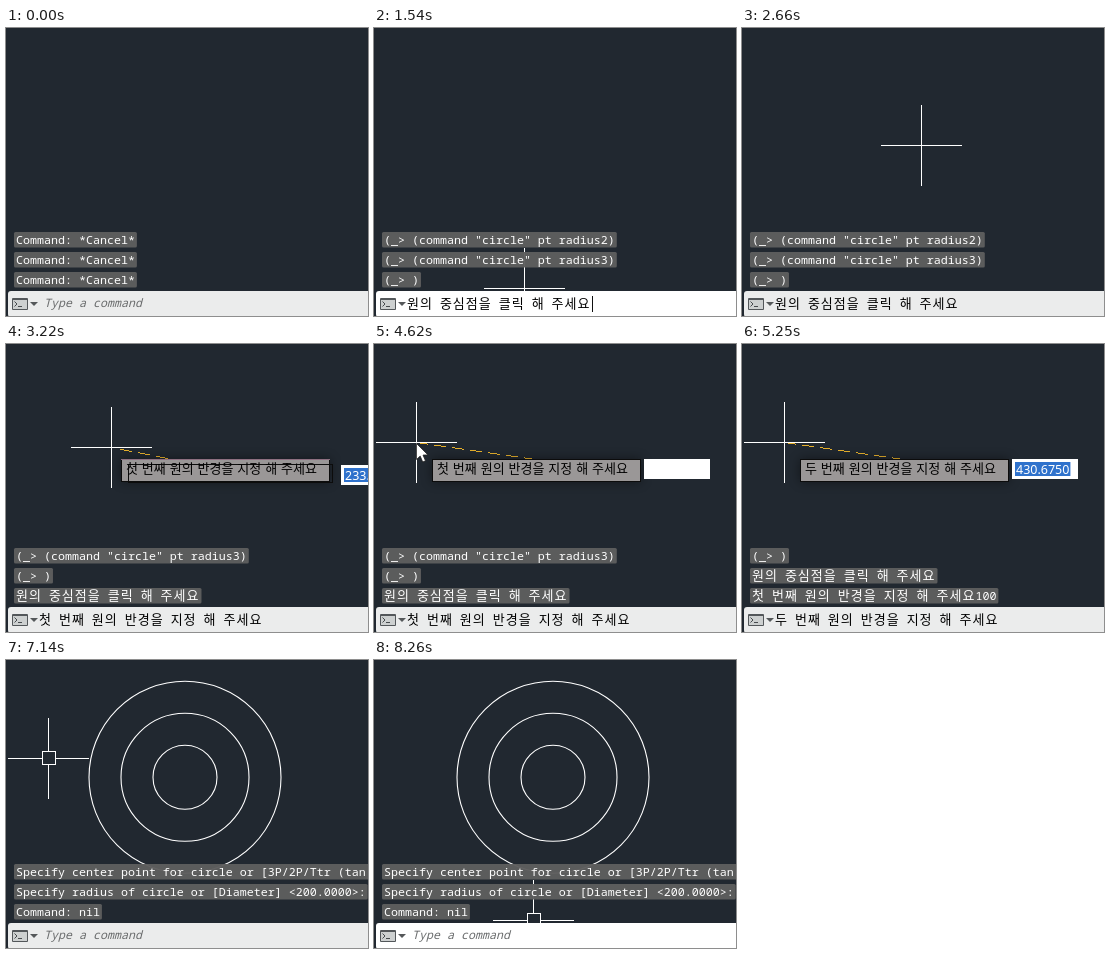
Recreate the animation shown at these times as an HTML page with a canvas. Size 362 px wide and 288 px high, loop 8680 ms.

```html
<!DOCTYPE html>
<html lang="ko">
<head>
<meta charset="utf-8">
<title>Command line circles</title>
<style>
  html, body { margin: 0; width: 100%; height: 100%; overflow: hidden; background: #212830; }
  canvas { display: block; }
</style>
</head>
<body>
<canvas id="stage" width="362" height="288"></canvas>
<script>
const ctx = document.getElementById('stage').getContext('2d');
const W = 362, H = 288, LOOP = 8680, STEP = 70;
const KR = '13px "Noto Sans CJK KR", "Noto Sans CJK JP", "Noto Sans CJK", sans-serif';
const MONO = '11.67px "Noto Sans Mono", "DejaVu Sans Mono", monospace';
const CENTER = { x: 179, y: 117 }, UNIT = 32;

const cancel = 'Command: *Cancel*';
const call = n => '(_> (command "circle" pt radius' + n + ')';
const close = '(_> )';
const pick = '원의 중심점을 클릭 해 주세요';
const ask = n => n + ' 번째 원의 반경을 지정 해 주세요';

// Timelines: [start ms, value]
const history = [
  [0, [cancel, cancel, cancel]],
  [490, [cancel, cancel, 'Command:']],
  [1050, [call(1), call(2), call(3)]],
  [1470, [call(2), call(3), close]],
  [2870, [call(3), close, pick]],
  [5180, [close, pick, ask('첫') + '100']],
  [6230, [pick, ask('첫') + '100', ask('두') + '200']],
  [7070, ['Specify center point for circle or [3P/2P/Ttr (tan tan radius)]:',
          'Specify radius of circle or [Diameter] <200.0000>:', 'Command: nil']]
];
const prompts = [[0, null], [420, ''], [1050, '(_> '], [1540, pick], [2870, ask('첫')],
                 [5180, ask('두')], [6230, ask('세')], [7070, null]];
const tips = [[0, ''], [1890, 'full'], [2660, ''], [2870, 'full'], [5110, 'bar'], [5250, 'full'],
              [6160, 'bar'], [6230, 'full'], [6930, 'bar'], [7000, '']];
const typed = [[0, null], [4620, ''], [4690, '1'], [4760, '10'], [4900, '100'], [5250, null],
               [5530, ''], [5600, '2'], [5810, '20'], [5880, '200'], [6230, null],
               [6370, ''], [6440, '3'], [6580, '30'], [6720, '300'], [6930, null]];
const path = [[1680, 150, 260], [1960, 141, 200], [2170, 143, 148], [2240, 150, 134],
              [2590, 173, 116], [2660, 179, 117], [2800, 179, 117], [3080, 122, 109],
              [3220, 105, 103], [3290, 99, 98], [3360, 80, 93], [3500, 42, 98],
              [7840, 42, 98], [7910, 40, 112], [7980, 85, 140], [8120, 128, 215], [8260, 159, 260]];

const at = (list, t) => list.filter(e => e[0] <= t).pop()[1];
const within = (t, a, b) => t >= a && t < b;

function cursor(t) {
  const i = path.findIndex(p => p[0] > t);
  if (i < 1) {
    const p = i ? path[path.length - 1] : path[0];
    return { x: p[1], y: p[2] };
  }
  const a = path[i - 1], b = path[i], k = (t - a[0]) / (b[0] - a[0]);
  return { x: Math.round(a[1] + (b[1] - a[1]) * k), y: Math.round(a[2] + (b[2] - a[2]) * k) };
}

function rect(x, y, w, h, color) {
  ctx.fillStyle = color;
  ctx.fillRect(x, y, w, h);
}

function round(x, y, w, h, r, color) {
  ctx.fillStyle = color;
  ctx.beginPath();
  ctx.roundRect(x, y, w, h, r);
  ctx.fill();
}

function poly(points, color) {
  ctx.fillStyle = color;
  ctx.beginPath();
  points.forEach(p => ctx.lineTo(p[0], p[1]));
  ctx.closePath();
  ctx.fill();
}

function frame(x, y, w, h, color) {
  ctx.strokeStyle = color;
  ctx.lineWidth = 1;
  ctx.strokeRect(x + .5, y + .5, w - 1, h - 1);
}

function setFont(font, letter = 0, word = 0) {
  ctx.font = font;
  ctx.letterSpacing = letter + 'px';
  ctx.wordSpacing = word + 'px';
}

// Monospaced Latin mixed with wider Hangul; returns the width.
function mixed(text, x, y, color) {
  let w = 0;
  for (const run of text.match(/[가-힣]+|[^가-힣]+/g) || []) {
    if (run >= '가') setFont(KR, 1);
    else setFont(MONO);
    if (color) {
      ctx.fillStyle = color;
      ctx.fillText(run, x + w, y);
    }
    w += ctx.measureText(run).width;
  }
  return w;
}

function drawCircles(t) {
  const count = t >= 7070 ? 3 : t >= 7000 ? 2 : 0;
  const c = cursor(t);
  for (let i = 1; i <= count; i++) {
    const r = UNIT * i;
    const gap = Math.abs(Math.hypot(c.x - CENTER.x, c.y - CENTER.y) - r);
    ctx.beginPath();
    ctx.arc(CENTER.x, CENTER.y + .3, r, 0, Math.PI * 2);
    if (t >= 7910 && gap < 5) {
      ctx.lineWidth = 4;
      ctx.strokeStyle = 'rgba(150,165,180,.6)';
      ctx.stroke();
    }
    ctx.lineWidth = 1.1;
    ctx.strokeStyle = '#fff';
    ctx.stroke();
  }
}

function drawRubber(c) {
  const dx = CENTER.x - c.x, dy = CENTER.y + .5 - c.y, n = Math.max(Math.abs(dx), 1);
  for (let i = 0; i < n; i++) {
    if (i % 18 < 12) rect(CENTER.x - Math.round(dx * i / n), Math.round(c.y + dy * (1 - i / n)), 1, 1, '#e6b02c');
  }
}

function drawCross(c, box) {
  const white = '#fff';
  if (!box) {
    rect(c.x - 40, c.y, 81, 1, white);
    rect(c.x, c.y - 40, 1, 81, white);
    return;
  }
  for (const s of [-40, 7]) {
    rect(c.x + s, c.y, 34, 1, white);
    rect(c.x, c.y + s, 1, 34, white);
  }
  frame(c.x - 6, c.y - 7, 14, 14, white);
}

function drawHistory(t) {
  at(history, t).forEach((line, i) => {
    const y = 204 + i * 20;
    round(8, y, mixed(line, 0, 0) + 4, 15.5, 1.5, 'rgba(94,94,94,.96)');
    mixed(line, 10, y + 12, '#fff');
  });
}

function drawBar(t) {
  const lit = within(t, STEP, 1820) || t >= 8260;
  round(2, 263, W, 26, [3, 0, 0, 3], lit ? '#fff' : '#ebecec');
  round(6, 270, 16, 12, 1, '#53575a');
  rect(7, 272, 14, 9, '#cdd0d0');
  ctx.strokeStyle = '#474b4e';
  ctx.lineWidth = 1;
  ctx.beginPath();
  ctx.moveTo(8.5, 273.5);
  ctx.lineTo(11, 276);
  ctx.lineTo(8.5, 278.5);
  ctx.moveTo(12, 278.5);
  ctx.lineTo(16, 278.5);
  ctx.stroke();
  poly([[24, 274], [32, 274], [28, 278]], '#55585a');
  const text = at(prompts, t);
  if (text === null) {
    setFont('italic ' + MONO);
    ctx.fillStyle = '#6a6c6d';
    ctx.fillText('Type a command', 38, 279);
    return;
  }
  const w = mixed(text, 33, 280, '#000');
  if (t < 1750) rect(Math.round(35 + w), 268, 1, 16, '#111');
}

function tipBody(x, y, w, outlined) {
  ctx.save();
  ctx.shadowColor = 'rgba(0,0,0,.45)';
  ctx.shadowBlur = 11;
  rect(x, y, w, 23, '#9a9797');
  ctx.restore();
  if (outlined) frame(x, y, w, 23, '#0c0c0c');
}

function drawTip(t) {
  const mode = at(tips, t);
  if (!mode) return;
  const text = at(prompts, t) || ask('세');
  setFont(KR, 0, 1);
  const w = Math.round(ctx.measureText(text).width + 18);
  const first = t < 2870, moving = within(t, 2870, 3500);
  const c = cursor(t);
  // The box trails the cursor on the first move and smears on the second.
  const p = first ? cursor(t - STEP) : moving ? cursor(t + STEP) : c;
  const x = p.x + 16, y = p.y + 17;
  if (mode === 'bar') return tipBody(x, y, w, false);

  tipBody(x, y, w, true);
  if (moving) {
    rect(x, y, w, 1, '#8d6f80');
    frame(c.x + 17, c.y + 17, w - 4, 19, '#0c0c0c');
  }
  ctx.fillStyle = '#000';
  ctx.fillText(text, x + 5, y + 14);

  const drift = moving ? 2 : 0;
  const ex = first ? x + w + 1 : c.x + w + 19 + drift;
  const ey = first ? y + 5 : c.y + 17 + drift / 2;
  const input = at(typed, t);
  rect(ex, ey, 66, 20, '#fff');
  setFont('12.5px "Noto Sans", "Open Sans", sans-serif');
  if (input === null) {
    const dist = Math.hypot(c.x - CENTER.x + .5, c.y - CENTER.y) / UNIT * 100;
    const value = (first ? 1465.3 + c.x / UNIT * 100 : dist).toFixed(4);
    rect(ex + 3, ey + 3, Math.min(ctx.measureText(value).width + 2, 60), 14, '#2f72cc');
    ctx.fillStyle = '#fff';
    ctx.fillText(value, ex + 4, ey + 14.5);
  } else if (input) {
    ctx.fillStyle = '#111';
    ctx.fillText(input, ex + 3, ey + 14.5);
    rect(Math.round(ex + 4 + ctx.measureText(input).width), ey + 3, 1, 14, '#111');
  }
}

function drawPointer(t) {
  if (!within(t, 4620, 4900) && !within(t, 5530, 5880) && !within(t, 6370, 6720)) return;
  ctx.save();
  ctx.translate(42.5, 99.5);
  poly([[0, 0], [0, 16], [3.7, 12.6], [6.2, 18.5], [9, 17.3], [6.5, 11.6], [11.5, 11.4]], '#fff');
  ctx.strokeStyle = '#222';
  ctx.lineWidth = .8;
  ctx.stroke();
  ctx.restore();
}

function draw(t) {
  const c = cursor(t);
  const blank = within(t, 6160, 6230) || within(t, 6930, 7140);
  rect(0, 0, W, H, '#212830');
  drawCircles(t);
  if (within(t, 2870, 6930) && !blank) drawRubber(c);
  if (t >= 1470 && !blank) drawCross(c, t >= 7140);
  drawHistory(t);
  drawBar(t);
  drawTip(t);
  drawPointer(t);
}

const start = performance.now();
function tick() {
  const t = (performance.now() - start) % LOOP;
  draw(Math.floor(t / STEP) * STEP);
  requestAnimationFrame(tick);
}
tick();
</script>
</body>
</html>
```
